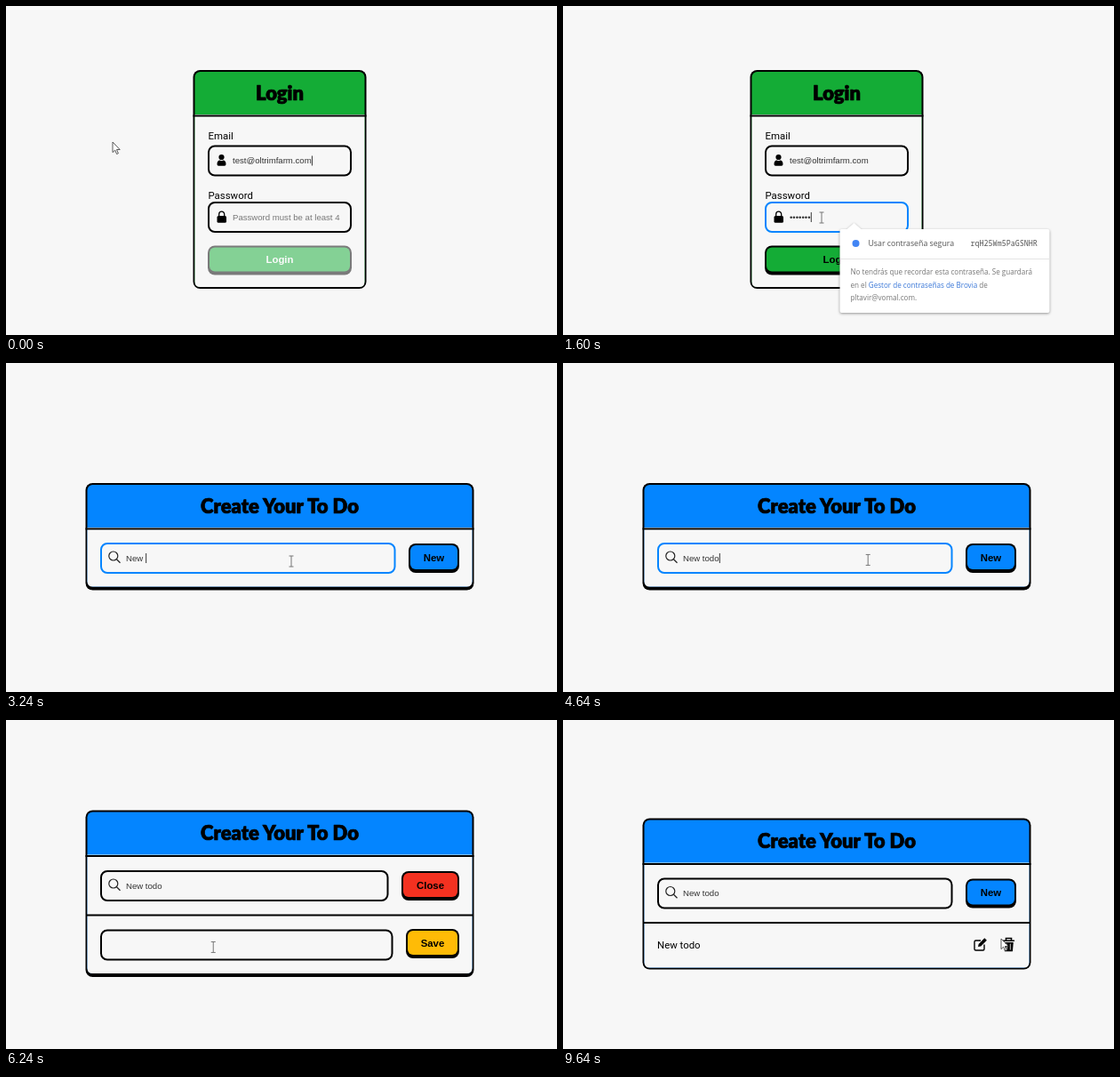
An HTML page that plays this animation: 620x370 px, repeating every 9840 ms.

```html
<!DOCTYPE html>
<html lang="en">
<head>
<meta charset="utf-8">
<title>Login and to do</title>
<style>
html, body { margin: 0; height: 100%; overflow: hidden; background: #f7f7f7; }
svg { display: block; width: 100vw; height: 100vh; }
text { white-space: pre; fill: #000; }
.title { font: 900 22px Lato, sans-serif; text-anchor: middle; stroke: #000; stroke-width: .7; stroke-linejoin: round; }
.label { font: 11.4px Roboto, sans-serif; }
.input { font: 9.6px "Liberation Sans", Arial, sans-serif; fill: #333; }
.hint { fill: #777; }
.btn { font: bold 11.4px "Liberation Sans", Arial, sans-serif; text-anchor: middle; }
.pop { font: 8.1px "Open Sans", sans-serif; fill: #777; }
.head { font-size: 8.75px; fill: #555; }
.mono { font: 8.4px "Noto Sans Mono", monospace; fill: #555; }
.link { fill: #3b78d8; }
</style>
</head>
<body>
<svg id="stage" viewBox="0 0 620 370"></svg>
<script>
const LOOP = 9840, STEP = 40;
const BG = '#f7f7f7', GREEN = '#14ac36', BLUE = '#0485ff', RED = '#f43120', AMBER = '#ffbb06';
const stage = document.getElementById('stage');
const pen = document.createElement('canvas').getContext('2d');

// time, x, y of the pointer
const track = [
  [0, 120, 153], [40, 120, 153], [560, 291, 238], [1600, 291, 238], [1840, 316, 293],
  [3200, 316, 293], [3240, 321, 223], [4440, 321, 223], [5280, 476, 212], [5520, 476, 212],
  [6360, 219, 258], [6440, 219, 258], [6480, 225, 257], [9080, 225, 257], [9240, 493, 246], [LOOP, 493, 246]
];
const typedTodo = [[3240, 'New '], [3400, 'New t'], [3480, 'New to'], [3760, 'New tod'], [3840, 'New todo']];
const typedItem = [[0, ''], [7080, 'N'], [7680, 'New '], [7880, 'New t'], [8040, 'New to'], [8280, 'New tod'], [8360, 'New todo']];

let mouse, overText;

const during = (t, a, b) => t >= a && t < b;
const typed = (list, t) => list.filter(k => k[0] <= t).pop()[1];

function pointerAt(t) {
  const i = track.findIndex(k => k[0] > t), [t0, x0, y0] = track[i - 1], [t1, x1, y1] = track[i];
  const p = (t - t0) / (t1 - t0), e = p * p * (3 - 2 * p);
  return [x0 + (x1 - x0) * e, y0 + (y1 - y0) * e];
}

const rect = (x, y, w, h, r, fill, more = '') =>
  `<rect x="${x}" y="${y}" width="${w}" height="${h}" rx="${r}" fill="${fill}" ${more}/>`;
const text = (x, y, s, cls, more = '') => `<text x="${x}" y="${y}" class="${cls}" ${more}>${s}</text>`;
const path = (d, more = '') => `<path d="${d}" ${more}/>`;
const line = (d, w = 1, color = '#000') => path(d, `fill="none" stroke="${color}" stroke-width="${w}"`);

function card(x, y, w, h, color, title, foot) {
  const b = y + h - foot, r = x + w - 2;
  return rect(x, y, w, h, 8, '#000') + rect(x + 2, y + 2, w - 4, h - 2 - foot, 6, color) +
    path(`M${x + 2} ${y + 50}H${r}V${b - 6}q0 6-6 6H${x + 8}q-6 0-6-6z`, `fill="${BG}"`) +
    rect(x, y + 50.5, w, 2, 0, '#000') + text(x + w / 2, y + 33.5, title, 'title');
}

function field(x, y, w, focus, value, { left = 28, hint = '', caret = focus } = {}) {
  if (mouse[0] > x && mouse[0] < x + w && mouse[1] > y && mouse[1] < y + 35) overText = true;
  pen.font = '9.6px "Liberation Sans", Arial, sans-serif';
  const end = x + left + pen.measureText(value).width + .8;
  return rect(x + 1, y + 1, w - 2, 33, 7, BG, `stroke="${focus ? BLUE : '#000'}" stroke-width="2"`) +
    text(x + left, y + 20.7, value || hint, value ? 'input' : 'input hint') +
    (caret ? line(`M${end} ${y + 12}v11`, .9, '#222') : '');
}

function button(x, y, w, label, color, down, ink = '#000') {
  if (down) y += 3;
  return rect(x, y, w, down ? 32 : 33, 8, '#000') + rect(x + 2, y + 2, w - 4, down ? 28 : 27, 6, color) +
    text(x + w / 2, y + 19.7, label, 'btn', `style="fill:${ink}"`);
}

function popup(x) {
  const body = `M${x + 2} 251h6l8-7 8 7H${x + 234}q2 0 2 2V343q0 2-2 2H${x + 2}q-2 0-2-2V253q0-2 2-2z`;
  return path(body, 'fill="#fff" style="filter:drop-shadow(0 1px 1.5px #0006)"') +
    line(`M${x} 284.5h236`, 1, '#e4e4e4') + `<circle cx="${x + 18}" cy="267" r="4" fill="#4285f4"/>` +
    text(x + 32, 270.3, 'Usar contraseña segura', 'pop head') + text(x + 147, 270, 'rqH25Wm5PaGSNHR', 'mono') +
    text(x + 12, 302.3, 'No tendrás que recordar esta contraseña. Se guardará', 'pop') +
    text(x + 12, 317, 'en el <tspan class="link">Gestor de contraseñas de Brovia</tspan> de', 'pop') +
    text(x + 12, 331.3, 'pltavir@vomal.com.', 'pop');
}

function login(t) {
  const count = Math.max(0, Math.min(7, Math.floor((t - 840) / 60)));
  const ready = count > 3;
  let s = card(210.5, 72, 195, 246, GREEN, 'Login', 2) +
    text(227.5, 150, 'Email', 'label') + text(227.5, 217, 'Password', 'label') +
    field(227, 156.5, 162, false, 'test@oltrimfarm.com', { caret: t < 600 }) +
    field(227, 220, 162, during(t, 600, 1640), '•'.repeat(count),
      { hint: 'Password must be at least 4', caret: during(t, 600, 2120) }) +
    '<circle cx="242.5" cy="170" r="3.1"/>' +
    path('M237.5 178q0-4.5 3.2-4.5 1.8 1 3.6 0 3.2 0 3.2 4.5 0 1.8-1.6 1.8h-6.8q-1.6 0-1.6-1.8z') +
    rect(237.5, 236, 10.5, 7.8, 1.6, '#000') + line('M239.7 236.5v-2.3a3 3 0 0 1 6 0v2.3', 1.3);
  s += `<g opacity="${ready ? 1 : .5}">` +
    button(227, 269.5, 162, 'Login', GREEN, during(t, 2400, 2560), ready ? '#000' : '#fff') + '</g>';
  if (during(t, 640, 1680)) s += popup(t < 1000 ? 301.5 : 311.5);
  return s;
}

function searchRow(y, w, focus, value) {
  return field(106, y, w, focus, value, { left: 29 }) +
    `<circle cx="120.8" cy="${y + 15}" r="5" fill="none" stroke="#222" stroke-width="1.2"/>` +
    line(`M124.5 ${y + 18.7}l4 4`, 1.3, '#222');
}

// list of earlier entries below the empty input
function suggestions(t) {
  const rows = t < 7080 ? ['Todo', 'New todo', 'New', 'New todo 2'] : ['New todo', 'New', 'New todo 2'];
  const fade = 1 - Math.max(0, Math.min(1, (t - 7280) / 240));
  return `<g opacity="${fade}">` +
    rect(107, 271, 329, rows.length * 24 + 8, 3, '#fff', 'style="filter:drop-shadow(0 1px 1.5px #0005)"') +
    rows.map((r, i) => text(135, 290 + i * 24, r, 'input')).join('') + '</g>';
}

function todo(t) {
  const title = 'Create Your To Do';
  if (t < 5440) {
    return card(89.5, 135, 437, 120.5, BLUE, title, 4) + searchRow(202, 332.5, t < 5320, typed(typedTodo, t)) +
      button(453, 203, 57, 'New', BLUE, t >= 5320);
  }
  if (t < 9440) {
    const caret = during(t, 6400, 9280) && !during(t, 6880, 7080) && !during(t, 8880, 9120);
    return card(89.5, 101.5, 437, 187.5, BLUE, title, 4) + searchRow(169, 324.5, false, 'New todo') +
      button(445, 170, 65, 'Close', RED) + rect(90, 218.5, 436, 2, 0, '#000') +
      field(106, 235.5, 329.5, during(t, 6400, 9280), typed(typedItem, t), { left: 29, caret }) +
      button(450, 235, 60, 'Save', AMBER, t >= 9280) +
      (during(t, 6400, 7520) ? suggestions(t) : '');
  }
  return card(89.5, 110.5, 437, 170, BLUE, title, 2) + searchRow(177.5, 332.5, false, 'New todo') +
    button(453, 178.5, 57, 'New', BLUE) + rect(90, 227, 436, 2, 0, '#000') +
    text(106, 257, 'New todo', 'label') +
    line('M470 248h-5.5q-1.5 0-1.5 1.5v8q0 1.5 1.5 1.5h8q1.5 0 1.5-1.5v-5', 1.4) +
    path('M467 255l.7-3 6.6-6.7 2.6 2.5-6.7 6.7z') +
    line('M498.5 247.5v-2h6v2M494.5 248.2h13.5', 1.6) + path('M496 250h10.8l-.9 10.2h-9z') +
    line('M499.5 251.5v7M503.3 251.5v7', .8, BG);
}

function pointer() {
  const shape = overText
    ? line('M-2.5-6h5M0-6V6M-2.5 6h5', 1, '#777')
    : path('M0 0V11.6L2.7 9.1 4.6 13.5 6.4 12.7 4.5 8.5H8.2Z', 'fill="#fff" stroke="#333" stroke-width=".8"');
  return `<g transform="translate(${mouse})">${shape}</g>`;
}

function draw(now) {
  const t = Math.floor(now % LOOP / STEP) * STEP;
  mouse = pointerAt(t);
  overText = false;
  const page = t < 3240 ? login(t) : todo(t);
  stage.innerHTML = page + pointer();
}

const start = performance.now();
function tick() {
  draw(performance.now() - start);
  requestAnimationFrame(tick);
}
tick();
</script>
</body>
</html>
```
